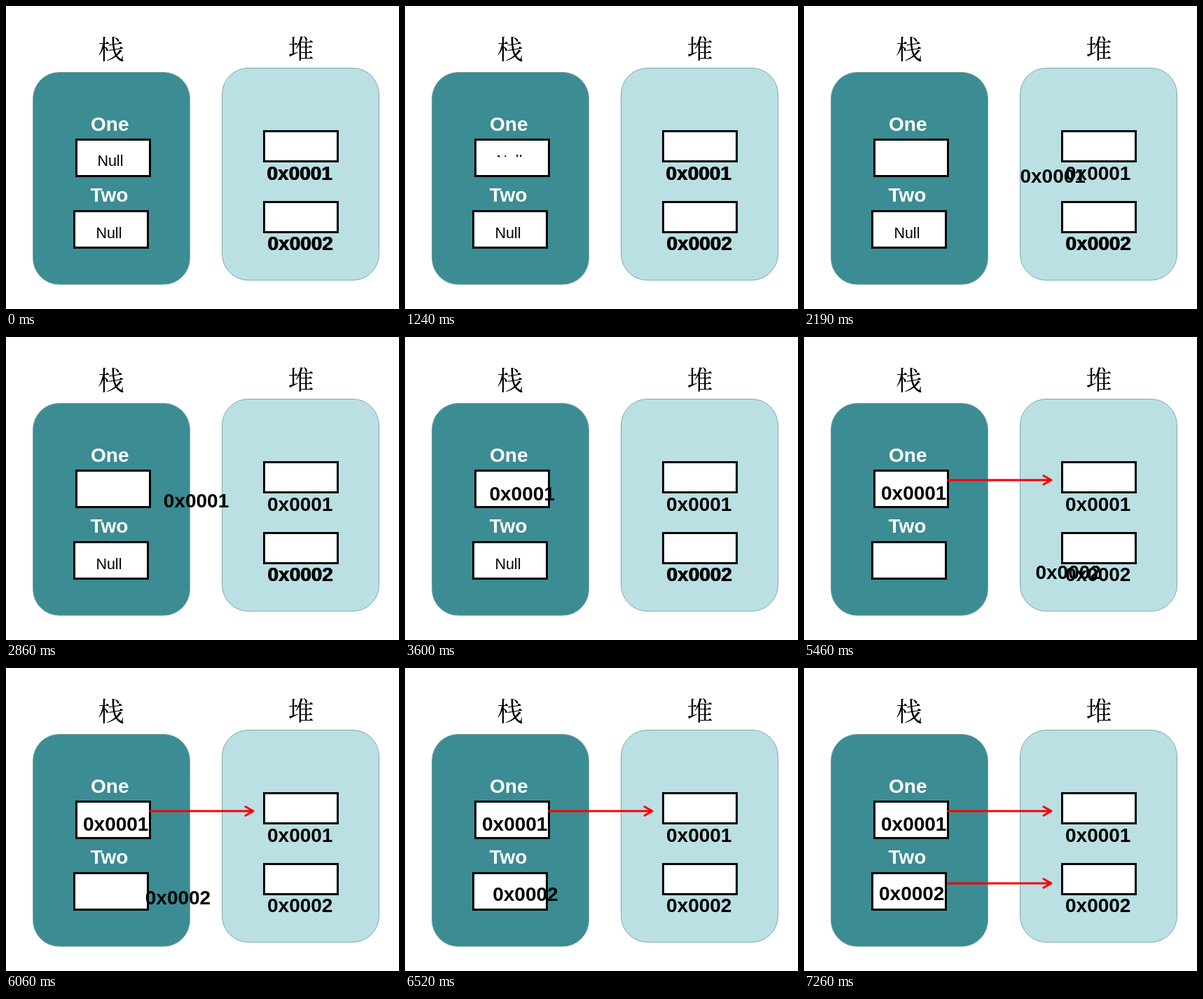
Animation of 561 by 432 pixels, one loop 8370 ms. Source, as an HTML page:

```html
<!DOCTYPE html>
<html lang="zh">
<head>
<meta charset="utf-8">
<title>栈与堆</title>
<style>
  html, body { margin: 0; width: 100%; height: 100%; overflow: hidden; background: #fff; }
  svg { display: block; width: 561px; height: 432px; }
  text { font-family: "Liberation Sans", Arial, sans-serif; white-space: pre; }
  .title { font: 37px "Noto Serif CJK SC", "Noto Sans CJK SC", "Noto Sans CJK", serif; text-anchor: middle; }
  .name { font-size: 28px; font-weight: bold; fill: #fff; }
  .addr { font-size: 28px; font-weight: bold; }
  .null { font-size: 21.5px; }
  .cell { fill: #fff; stroke: #000; stroke-width: 3; }
  .panel { stroke: #82a8ab; stroke-width: 1; }
  .arrow { fill: none; stroke: #fb0007; stroke-width: 3; stroke-linecap: round; stroke-linejoin: round; }
</style>
</head>
<body>
<svg id="stage" viewBox="0 0 561 432" xmlns="http://www.w3.org/2000/svg"></svg>
<script>
const LOOP = 8370;
const stage = document.getElementById("stage");

function add(tag, attrs, label, parent = stage) {
  const el = document.createElementNS("http://www.w3.org/2000/svg", tag);
  for (const key in attrs) el.setAttribute(key, attrs[key]);
  if (label) el.textContent = label;
  parent.appendChild(el);
  return el;
}

const text = (cls, x, y, label) => add("text", { class: cls, x, y }, label);
const cell = (x, y, height) => add("rect", { class: "cell", x, y, width: 105, height });
const panel = (x, y, fill) =>
  add("rect", { class: "panel", x, y, width: 224, height: 302.5, rx: 37.5, fill });

panel(38.5, 94.5, "#3c8c93");
panel(308.5, 88.5, "#bae0e3");
text("title", 150, 76, "栈");
text("title", 421, 75, "堆");
text("name", 121, 178, "One");
text("name", 120.5, 279, "Two");
cell(100.5, 190.5, 52);
cell(97.5, 292.5, 52);
cell(368.5, 178.5, 43);
cell(368.5, 279.5, 43);
text("addr", 373, 247.5, "0x0001");
text("addr", 373, 347.5, "0x0002");

// One pointer: null is wiped away, the address travels over, the arrow fades in.
function pointer(id, label, nullAt, wipe, move, arrow) {
  const clip = add("clipPath", { id });
  const mask = add("rect", { x: nullAt.x, y: nullAt.y - 16, width: 45, height: 17 }, "", clip);
  const empty = text("null", nullAt.x, nullAt.y, "Null");
  empty.setAttribute("clip-path", `url(#${id})`);
  const address = text("addr", 0, 0, label);
  const y = arrow.y;
  const line = add("path", {
    class: "arrow",
    d: `M205.5 ${y}H353M342 ${y - 6.2}L353 ${y}L342 ${y + 6.2}`
  });

  return t => {
    const gone = wiped(t, wipe);
    mask.setAttribute("height", gone ? 16 - 15 * gone : 17);
    empty.style.display = gone < 1 ? "" : "none";

    let [x, base] = move.rest;
    if (t >= move.shown) {
      const k = ease((t - move.start) / 2000);
      x = mix(move.from[0], move.to[0], k);
      base = mix(move.from[1], move.to[1], k);
    }
    address.setAttribute("x", x);
    address.setAttribute("y", base);

    const age = t - arrow.start;
    line.style.opacity = age < 0 ? 0 : age < 200 ? 0.3 : age < 330 ? 0.65 : 1;
  };
}

const mix = (a, b, k) => a + (b - a) * k;

// Constant acceleration, then constant deceleration.
function ease(k) {
  k = Math.min(1, Math.max(0, k));
  return k < 0.5 ? 2 * k * k : 1 - 2 * (1 - k) * (1 - k);
}

function wiped(t, { first, last, steps }) {
  if (t < first) return 0;
  const step = Math.floor((t - first) * (steps - 1) / (last - first) + 1e-6);
  return Math.min(1, (step + 1) / steps);
}

const pointers = [
  pointer("wipe-one", "0x0001", { x: 130.4, y: 228 },
    { first: 590, last: 1320, steps: 13 },
    { shown: 1930, start: 1920, rest: [372, 247.5], from: [316, 252.5], to: [110, 232] },
    { y: 204, start: 3970 }),
  pointer("wipe-two", "0x0002", { x: 128.4, y: 331 },
    { first: 4580, last: 4760, steps: 5 },
    { shown: 4920, start: 4890, rest: [374, 347.9], from: [374, 347.9], to: [107, 331] },
    { y: 307, start: 6930 })
];

function draw(now) {
  const t = now % LOOP;
  pointers.forEach(update => update(t));
}

function tick() {
  draw(performance.now());
  requestAnimationFrame(tick);
}

draw(0);
requestAnimationFrame(tick);
</script>
</body>
</html>
```
